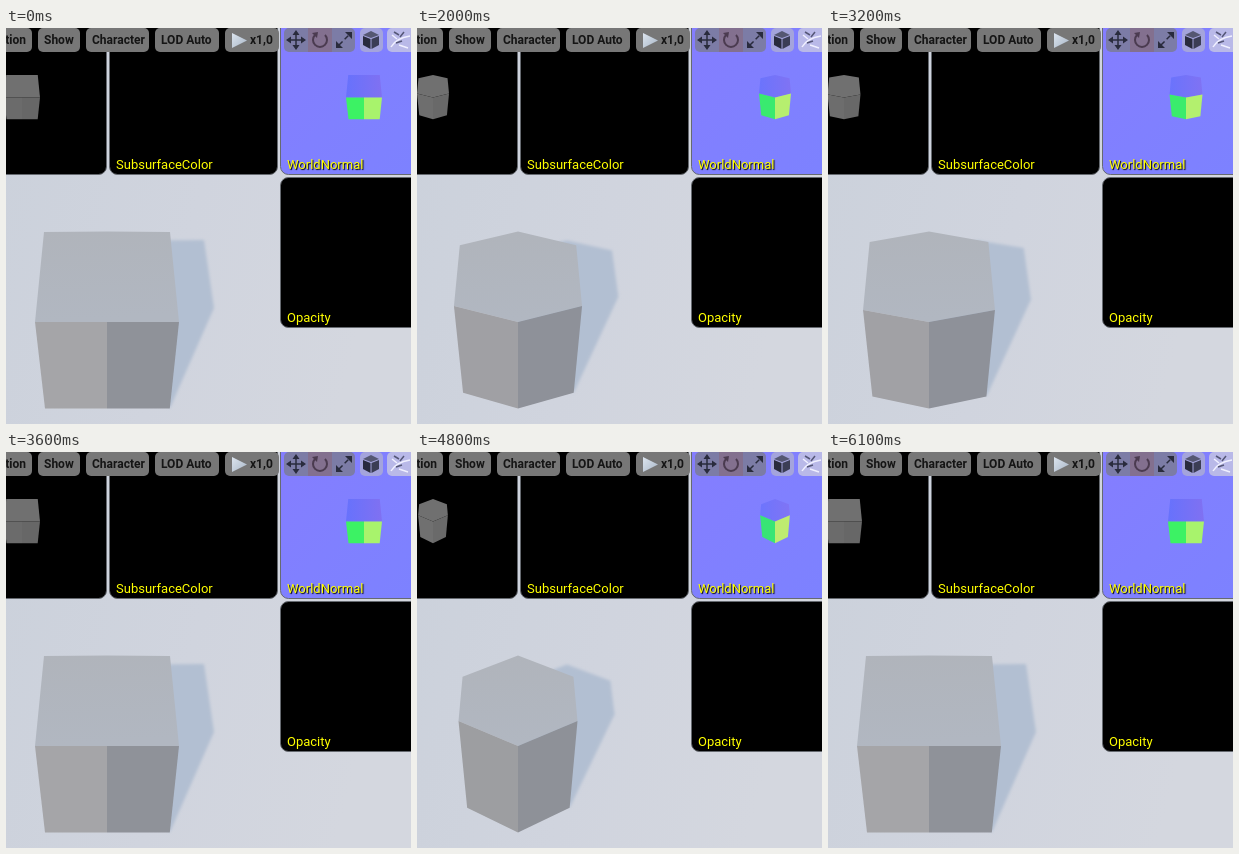
Write an HTML page that moves like this. It is 405 px wide and 396 px high and loops after 6.2 s.

```html
<!DOCTYPE html>
<html lang="en">
<head>
<meta charset="utf-8">
<title>Morphing prism viewport</title>
<style>
html, body { margin: 0; width: 100%; height: 100%; overflow: hidden; background: #cfd4dd; }
svg { display: block; }
text { font-family: Roboto, sans-serif; }
.label { font-size: 13px; fill: #ff0; text-shadow: 1px 1px 1px #000; }
.button { font-size: 12px; font-weight: 700; fill: #151515; }
.panel { stroke: #666a70; stroke-width: 1; }
</style>
</head>
<body>
<svg width="405" height="396" viewBox="0 0 405 396">
  <defs>
    <linearGradient id="floor" x2="1" y2=".25">
      <stop offset="0" stop-color="#cbd1db"/>
      <stop offset=".55" stop-color="#d0d4de"/>
      <stop offset="1" stop-color="#d4d7df"/>
    </linearGradient>
    <linearGradient id="lid" y2="1" x2=".1">
      <stop offset="0" stop-color="#b0b4bb"/>
      <stop offset="1" stop-color="#b1b7c1"/>
    </linearGradient>
    <linearGradient id="normalLid">
      <stop offset="0" stop-color="#6470fc"/>
      <stop offset="1" stop-color="#806ff0"/>
    </linearGradient>
    <linearGradient id="normalSky" x2="1" y2="1">
      <stop offset="0" stop-color="#857dff"/>
      <stop offset=".5" stop-color="#8080ff"/>
      <stop offset="1" stop-color="#7c82ff"/>
    </linearGradient>
    <linearGradient id="play" y2="1">
      <stop offset="0" stop-color="#dce4ee"/>
      <stop offset="1" stop-color="#a9b7c8"/>
    </linearGradient>
    <filter id="soft" x="-10%" y="-10%" width="120%" height="120%">
      <feGaussianBlur stdDeviation="1.5"/>
    </filter>
  </defs>

  <rect width="405" height="396" fill="url(#floor)"/>
  <polygon id="shadow" fill="#b2bfd2" filter="url(#soft)"/>
  <g id="main"></g>

  <g class="panel">
    <rect x="-20.5" y="-20.5" width="121" height="167" rx="8"/>
    <rect x="103.5" y="-20.5" width="168" height="167" rx="8"/>
    <rect x="274.5" y="-20.5" width="160" height="167" rx="8" fill="url(#normalSky)"/>
    <rect x="274.5" y="149.5" width="160" height="150" rx="8"/>
  </g>
  <g id="gray" transform="translate(-9.25 -4) scale(.25)"></g>
  <g id="normal" transform="translate(332.75 -4) scale(.25)"></g>
  <g class="label">
    <text x="110" y="141">SubsurfaceColor</text>
    <text x="281" y="141">WorldNormal</text>
    <text x="281" y="294">Opacity</text>
  </g>

  <g fill="#777">
    <rect x="-20" y="0" width="46" height="24" rx="5"/>
    <rect x="32" y="0" width="42" height="24" rx="5"/>
    <rect x="80" y="0" width="63" height="24" rx="5"/>
    <rect x="149" y="0" width="64" height="24" rx="5"/>
    <rect x="219" y="0" width="54" height="24" rx="5"/>
  </g>
  <g class="button">
    <text x="20" y="16" text-anchor="end">tion</text>
    <text x="38" y="16">Show</text>
    <text x="86" y="16">Character</text>
    <text x="155" y="16">LOD Auto</text>
    <text x="244" y="16">x1,0</text>
  </g>
  <path d="M226 5L241 12.500L226 20Z" fill="url(#play)"/>

  <rect x="278" width="71" height="24" rx="5" fill="#7c7ca6"/>
  <rect x="302" width="24" height="24" fill="#83708f"/>
  <rect x="354" width="23" height="24" rx="5" fill="#a4a4dc"/>
  <rect x="381" width="34" height="24" rx="5" fill="#b9b9e8"/>
  <g fill="none" stroke="#292b3d" stroke-width="1.5">
    <path d="M290 5V19M283 12H297"/>
    <path d="M309 7A7 7 0 1 0 319 7" stroke="#4b3b50" stroke-width="2"/>
    <path d="M333 17L343 7" stroke-dasharray="5 3"/>
  </g>
  <g fill="#292b3d">
    <path d="M290 2L293.500 7H286.500ZM290 22L293.500 17H286.500ZM280 12L285 8.500V15.500ZM300 12L295 8.500V15.500Z"/>
    <path d="M306 5L312 4L311 10Z" fill="#4b3b50"/>
    <path d="M339 4H346V11ZM330 13V20H337Z"/>
    <path d="M357 7L365 3L373 7L365 10Z" fill="#555772"/>
    <path d="M357 8L364.500 11V21L357 17Z"/>
    <path d="M373 8L365.500 11V21L373 17Z" fill="#3b3d55"/>
  </g>
  <g fill="none" stroke="#f0f0ff" stroke-width="1.5">
    <path d="M385 19Q390 10 404 8M386 7L391 11M393 17L402 20"/>
    <path d="M388 4L393 7M398 4L394 9M390 15L396 13" stroke="#555777"/>
  </g>
</svg>
<script>
const LOOP = 6200, STEP = 100, AXIS = 101;

// [time, morph]: 0 is the square prism, 1 the narrow diamond
const KEYS = [
  [0, 0], [1300, 0], [1900, .22], [2350, .72], [2700, .56], [3300, .19], [3600, 0],
  [3900, .06], [4000, .2], [4200, .75], [4400, .86], [4700, .62], [5200, .125],
  [5400, 0], [5750, .2], [6100, 0], [6200, 0]
];

const SKINS = {
  main: { top: 'url(#lid)', left: ['#a5a5a8', '#96979b'], right: ['#8f9299', '#8d9098'] },
  gray: { top: '#707070', left: ['#6b6b6b', '#747474'], right: ['#676767', '#6c6c6c'] },
  normal: { top: 'url(#normalLid)', left: ['#3cf264', '#34d985'], right: ['#a8f36c', '#d2e674'] }
};

const mix = (a, b, k) => a + (b - a) * k;
const move = (a, b, k) => [mix(a[0], b[0], k), mix(a[1], b[1], k)];
const mirror = ([x, y], axis = AXIS) => [2 * axis - x, y];

function mixColor([a, b], k) {
  const part = (hex, i) => parseInt(hex.slice(i, i + 2), 16);
  return `rgb(${[1, 3, 5].map(i => Math.round(mix(part(a, i), part(b, i), k)))})`;
}

function morphAt(t) {
  const i = KEYS.findIndex(key => key[0] > t);
  const [t0, a] = KEYS[i - 1], [t1, b] = KEYS[i];
  return mix(a, b, (t - t0) / (t1 - t0));
}

const shadow = document.getElementById('shadow');
const solids = Object.entries(SKINS).map(([id, skin]) => {
  const group = document.getElementById(id);
  const faces = {};
  for (const name of ['top', 'left', 'right']) {
    faces[name] = document.createElementNS('http://www.w3.org/2000/svg', 'polygon');
    group.append(faces[name]);
  }
  faces.top.setAttribute('fill', skin.top);
  return { skin, faces };
});

const place = (el, points) => el.setAttribute('points', points.join(' '));

function draw(k) {
  const back = [AXIS, 203.5], front = [AXIS, 294], foot = [AXIS, 380.5];
  const rear = move([38, 204], [52.5, 244], k);
  const near = move([29, 294], [53, 246], k);
  const base = move([39, 380.5], [60.4, 333], k);
  const rearR = mirror(rear), nearR = mirror(near), baseR = mirror(base, 101.4);

  const castRear = move([198, 212], [189, 244], k);
  const castNear = move([208, 280], [188, 246], k);
  place(shadow, [mirror(castRear, 150), [150, 212.5], castRear, castNear, baseR, front]);

  for (const { skin, faces } of solids) {
    place(faces.top, [back, rearR, nearR, front, near, rear]);
    place(faces.left, [near, front, foot, base]);
    place(faces.right, [front, nearR, baseR, foot]);
    faces.left.setAttribute('fill', mixColor(skin.left, k));
    faces.right.setAttribute('fill', mixColor(skin.right, k));
  }
  solids[2].faces.top.setAttribute('opacity', mix(.9, .5, k));
}

const start = performance.now();
function tick(now) {
  const t = Math.max(0, now - start) % LOOP;
  draw(morphAt(Math.floor(t / STEP) * STEP));
  requestAnimationFrame(tick);
}
draw(0);
requestAnimationFrame(tick);
</script>
</body>
</html>
```
